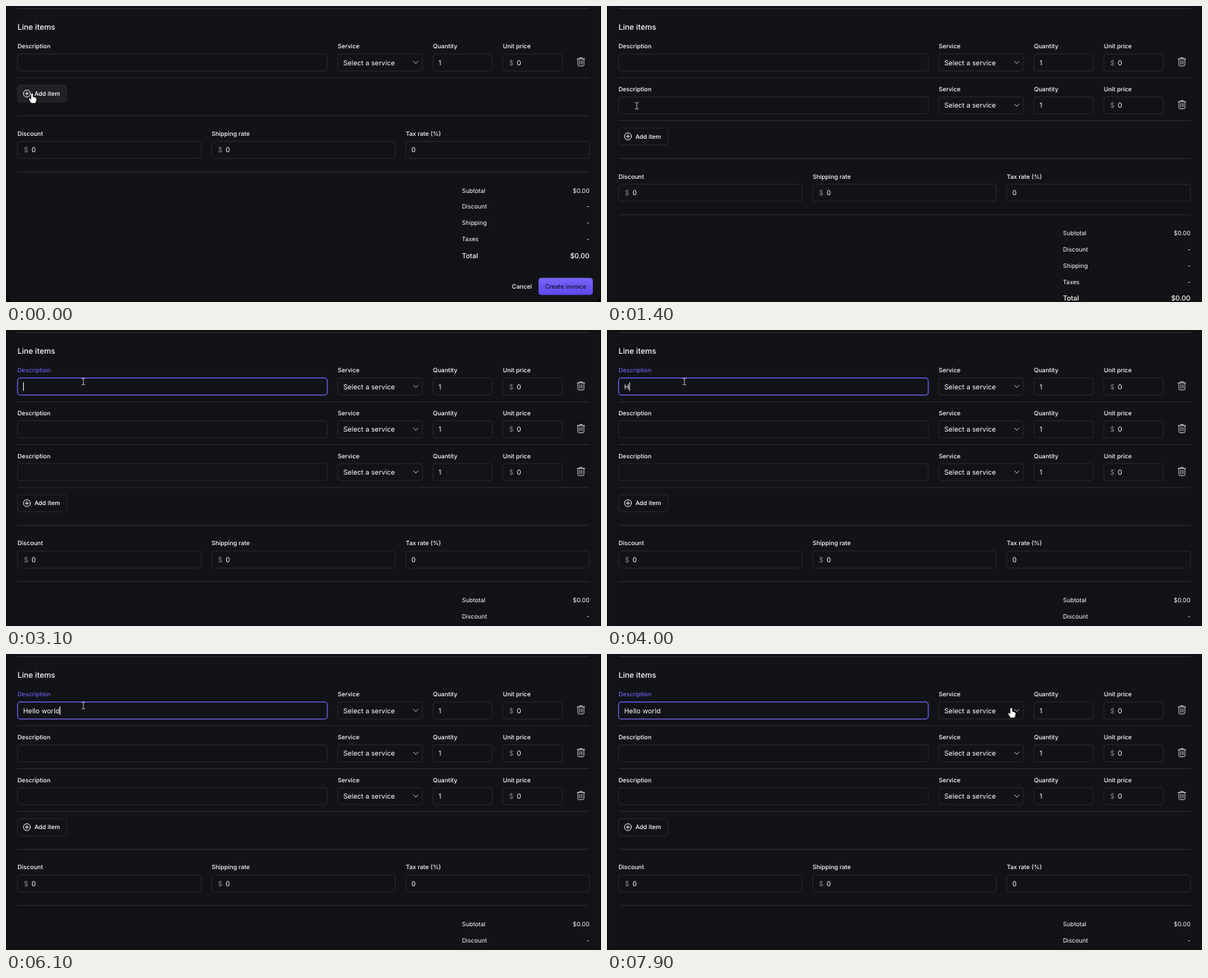
An HTML page with a canvas for the animation above (8 s loop, 800x399 px).

```html
<!DOCTYPE html>
<html lang="en">
<head>
<meta charset="utf-8">
<title>Invoice line items</title>
<style>
  html, body { margin: 0; height: 100%; overflow: hidden; background: #000; }
  canvas { display: block; width: 100vw; height: 100vh; }
</style>
</head>
<body>
<canvas id="stage"></canvas>
<script>
const W = 800, H = 399, LOOP = 8000, STEP = 100, BLINK = 510;
const ROW = 57.7, SMALL = 8.08, BODY = 9.23;
const LEFT = 15.5, RIGHT = 784.5, FIELD_H = 23;
const WHITE = '#fff', GREY = '#85868d', LINE = '#2b2c30', PANEL = '#121317', ACCENT = '#6c5eec';

const canvas = document.getElementById('stage');
const ctx = canvas.getContext('2d');
const dpr = window.devicePixelRatio || 1;
canvas.width = W * dpr;
canvas.height = H * dpr;
ctx.scale(dpr, dpr);
ctx.textRendering = 'geometricPrecision';

// Tracks: [time, ...values], eased between neighbours
const pointerTrack = [
  [0, 35, 118], [900, 35, 118], [1400, 40, 134.5], [2000, 53.4, 172.5], [2500, 53.4, 172.5],
  [3000, 104, 69.5], [6900, 104, 69.5], [7100, 149.3, 101.2], [7700, 543, 73], [7900, 543.5, 73]
];
const hoverTrack = [[0, .5], [200, 1], [900, 1], [1100, 0], [1800, 0], [2000, 1], [2400, 1], [2600, 0]];
const rowTimes = [0, 800, 2300];
const focusTime = 3080;
const keyTimes = [4000, 4080, 4080, 4800, 4900, 5000, 5400, 5500, 5600, 5700, 5880];
const message = 'Hello world';

const handShape = new Path2D('M-1.2 7V.9a1.2 1.2 0 0 1 2.4 0V4.6l3.4.8q1.4.4 1.3 1.9l-.5 3.2-.9 2.3H-1.2l-.8-1.7-2-3q-.5-1.3.7-1.5l2.1 1.3z');
const arrowShape = new Path2D('M0 0V9.6L2.2 7.6 3.8 11.1 5.3 10.4 3.8 7.1H6.8Z');
const beamShape = new Path2D('M-2-4.5Q0-4.5 0-3.5Q0-4.5 2-4.5M0-3.5V3.5M-2 4.5Q0 4.5 0 3.5Q0 4.5 2 4.5');
const trashShape = new Path2D('M-5-4.2H5M-1.8-4.2V-5.6H1.8V-4.2M-4-4.2V4Q-4 5.4-2.6 5.4H2.6Q4 5.4 4 4V-4.2M-1.3-1.8V3M1.3-1.8V3');
const chevronShape = new Path2D('M-3-1.4L0 1.6 3-1.4');
const plusShape = new Path2D('M-2.3 0H2.3M0-2.3V2.3M4.7 0A4.7 4.7 0 1 1-4.7 0A4.7 4.7 0 1 1 4.7 0');

function track(keys, t) {
  const next = keys.findIndex(key => key[0] > t);
  if (next < 0) return keys[keys.length - 1].slice(1);
  const a = keys[next - 1], b = keys[next];
  const u = (t - a[0]) / (b[0] - a[0]), e = u * u * (3 - 2 * u);
  return a.slice(1).map((v, i) => v + (b[i + 1] - v) * e);
}

function text(str, x, cy, { size = SMALL, weight = 500, color = WHITE, align = 'left' } = {}) {
  ctx.font = `${weight} ${size}px Inter, sans-serif`;
  ctx.textAlign = align;
  ctx.fillStyle = color;
  ctx.fillText(str, x, cy + size * .364);
}

function box(x, y, w, h, { fill, stroke = LINE, width = .9, radius = 4 } = {}) {
  ctx.beginPath();
  ctx.roundRect(x, y, w, h, radius);
  if (fill) { ctx.fillStyle = fill; ctx.fill(); }
  if (stroke) { ctx.strokeStyle = stroke; ctx.lineWidth = width; ctx.stroke(); }
}

function shape(path, x, y, { fill, stroke, width = 1 }) {
  ctx.save();
  ctx.translate(x, y);
  ctx.lineJoin = ctx.lineCap = 'round';
  if (stroke) { ctx.strokeStyle = stroke; ctx.lineWidth = width; ctx.stroke(path); }
  if (fill) { ctx.fillStyle = fill; ctx.fill(path); }
  ctx.restore();
}

function divider(y) {
  ctx.fillStyle = LINE;
  ctx.fillRect(LEFT, y - .5, RIGHT - LEFT, 1);
}

function field(label, x, w, top, value, { money = false, focus = false } = {}) {
  text(label, x, top + 54.3, { color: focus ? ACCENT : WHITE });
  box(x, top + 64.7, w, FIELD_H, focus ? { stroke: ACCENT, width: 1.25 } : {});
  if (money) text('$', x + 8.4, top + 76.2, { size: BODY, weight: 400, color: GREY });
  text(value, x + (money ? 18.8 : 7.4), top + 76.2, { size: BODY, weight: 400 });
}

function lineItem(top, description, focus) {
  field('Description', LEFT, 416.5, top, description, { focus });
  field('Service', 446, 114, top, 'Select a service');
  field('Quantity', 574, 80, top, '1');
  field('Unit price', 668, 80, top, '0', { money: true });
  shape(chevronShape, 551, top + 76, { stroke: '#b9bac0' });
  shape(trashShape, 773, top + 75.4, { stroke: '#dcdde1', width: .9 });
  divider(top + 96.8);
}

function footer(top, hover) {
  box(LEFT, top + 106.6, 66.3, FIELD_H, { fill: `rgba(255,255,255,${.12 * hover})` });
  shape(plusShape, 28.1, top + 118, { stroke: WHITE, width: .9 });
  text('Add item', 38.2, top + 118);
  divider(top + 147.9);

  const ratesTop = top + 117.8;
  field('Discount', LEFT, 247, ratesTop, '0', { money: true });
  field('Shipping rate', 276.5, 247, ratesTop, '0', { money: true });
  field('Tax rate (%)', 537.5, 247, ratesTop, '0');
  divider(top + 223.6);

  ['Subtotal', 'Discount', 'Shipping', 'Taxes'].forEach((name, i) => {
    const y = top + 248.8 + i * 21.75;
    text(name, 613, y, { weight: 400 });
    text(i ? '-' : '$0.00', RIGHT, y, { weight: 400, align: 'right' });
  });
  text('Total', 613, top + 336.4, { size: BODY });
  text('$0.00', RIGHT, top + 336.4, { size: BODY, align: 'right' });

  text('Cancel', 680.3, top + 378);
  const glow = ctx.createLinearGradient(0, top + 366, 0, top + 390);
  glow.addColorStop(0, '#7a67fb');
  glow.addColorStop(1, '#5a47ea');
  box(716, top + 366.5, 73, FIELD_H, { fill: glow, stroke: null });
  text('Create invoice', 752.5, top + 378, { align: 'center', color: '#141226' });
}

function pointer(x, y, rows) {
  const inside = (x0, x1, y0) => x > x0 && x < x1 && y > y0 && y < y0 + FIELD_H;
  const overRow = (x0, x1) => rowTimes.slice(0, rows).some((_, i) => inside(x0, x1, 64.6 + i * ROW));
  const outlined = { fill: '#fff', stroke: '#000', width: 1.4 };
  if (inside(LEFT, 82, 106.6 + (rows - 1) * ROW) || overRow(446, 560)) shape(handShape, x, y, outlined);
  else if (overRow(LEFT, 432)) shape(beamShape, x, y, { stroke: '#d8d8da', width: .8 });
  else shape(arrowShape, x, y, outlined);
}

function caret(typed, t) {
  const since = t - (typed.length ? keyTimes[typed.length - 1] : focusTime);
  if (Math.floor(since / BLINK) % 2) return;
  ctx.font = `400 ${BODY}px Inter, sans-serif`;
  ctx.fillStyle = WHITE;
  ctx.fillRect(23 + ctx.measureText(typed).width, 70.5, .9, 11.5);
}

function draw(t) {
  const rows = rowTimes.filter(time => time <= t).length;
  const typed = message.slice(0, keyTimes.filter(time => time <= t).length);
  const focused = t >= focusTime;
  const shift = (rows - 1) * ROW;

  ctx.fillStyle = '#000';
  ctx.fillRect(0, 0, W, H);
  box(.8, -20, 798.4, 418.6 + shift, { fill: PANEL, stroke: null, radius: 9 });
  divider(3.5);
  text('Line items', LEFT, 28.5, { size: 10.4 });
  for (let i = 0; i < rows; i++) lineItem(i * ROW, i ? '' : typed, !i && focused);
  footer(shift, track(hoverTrack, t)[0]);
  if (focused) caret(typed, t);
  pointer(...track(pointerTrack, t), rows);
}

const start = performance.now();
function frame() {
  const t = (performance.now() - start) % LOOP;
  draw(Math.floor(t / STEP) * STEP);
  requestAnimationFrame(frame);
}
frame();
</script>
</body>
</html>
```
